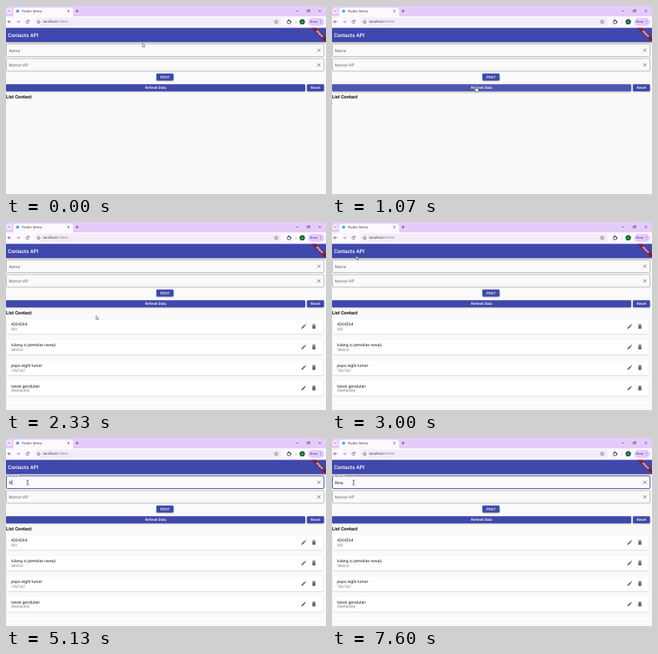
Write an HTML page with a canvas that moves like this. It is 400 px wide and 236 px high and loops after 8 s.

```html
<!DOCTYPE html>
<html lang="id">
<head>
<meta charset="utf-8">
<title>Contacts API</title>
<style>
html, body { margin: 0; width: 100%; height: 100%; overflow: hidden; background: #fafafa; }
canvas { display: block; width: 400px; height: 236px; }
</style>
</head>
<body>
<canvas id="stage"></canvas>
<script>
const W = 400, H = 236, LOOP = 8000, STEP = 200 / 3;
const BLUE = '#3f48ac', GREY = '#666', PAGE = '#fafafa';
const APP = 'Roboto, sans-serif', UI = '"Open Sans", sans-serif';
const canvas = document.getElementById('stage');
const dpr = window.devicePixelRatio || 1;
canvas.width = W * dpr;
canvas.height = H * dpr;
const c = canvas.getContext('2d');
c.textRendering = 'geometricPrecision';

const contacts = [
  ['4264264', '322'],
  ['tulang si pemalas rawaji', '585522'],
  ['popo eight lumer', '7267267'],
  ['tanok gendutan', '456456456']
];
// [time, text, caret shown]
const typing = [
  [0, '', true], [5130, 'R', true], [5330, 'R', false], [5470, 'R', true],
  [6130, '', true], [6270, 'Ri', true], [6400, 'Rin', true],
  [7070, 'Rina', true], [7270, 'Rina', false]
];
// [time, x, y] of the pointer tip
const moves = [
  [0, 170.5, 46.6], [70, 170.8, 48], [470, 177, 76], [870, 183, 106],
  [1070, 179.6, 101.3], [2329, 179.6, 101.3], [2330, 112.6, 117.6],
  [2670, 70, 82], [3000, 30.3, 42.4], [3130, 30.3, 43.2], [3329, 30.3, 43.2], [3330, 27, 56]
];

const clamp = (v) => Math.max(0, Math.min(1, v));
const lerp = (a, b, p) => a + (b - a) * p;
const ease = (p) => p * p * (3 - 2 * p);

function rect(x, y, w, h, fill) { c.fillStyle = fill; c.fillRect(x, y, w, h); }

function round(x, y, w, h, r, fill, stroke, lw) {
  c.beginPath();
  c.roundRect(x, y, w, h, r);
  if (fill) { c.fillStyle = fill; c.fill(); }
  if (stroke) { c.strokeStyle = stroke; c.lineWidth = lw; c.stroke(); }
}

function disc(x, y, r, fill) {
  c.beginPath();
  c.arc(x, y, r, 0, 7);
  c.fillStyle = fill;
  c.fill();
}

function path(points, color, lw, fill) {
  c.beginPath();
  for (let i = 0; i < points.length; i += 2) c.lineTo(points[i], points[i + 1]);
  if (fill) { c.closePath(); c.fillStyle = fill; c.fill(); }
  if (color) { c.strokeStyle = color; c.lineWidth = lw; c.stroke(); }
}

function text(s, x, y, size, color, weight = 400, family = APP, align = 'left') {
  c.font = `${weight} ${size}px ${family}`;
  c.textAlign = align;
  c.textBaseline = 'alphabetic';
  c.fillStyle = color;
  c.fillText(s, x, y + size * 0.355);
  return c.measureText(s).width;
}

function cross(x, y, r, color, lw) {
  path([x - r, y - r, x + r, y + r], color, lw);
  path([x - r, y + r, x + r, y - r], color, lw);
}

function shadowed(blur, dy, alpha, draw) {
  c.save();
  c.shadowColor = `rgba(0,0,0,${alpha})`;
  c.shadowBlur = blur * dpr;
  c.shadowOffsetY = dy * dpr;
  draw();
  c.restore();
}

function browser() {
  rect(0, 0, W, 14, '#e5cbfb');
  round(1, 2.5, 6.4, 7, 2, '#f3e6fd');
  path([3, 5.6, 4.2, 6.8, 5.4, 5.6], '#333', 0.6);
  round(9, 2, 75, 14, 3, '#fdf8ff');
  disc(14.6, 6.4, 1.9, '#45a5e6');
  text('Flutter Demo', 19.8, 6.5, 4.1, '#222', 400, UI);
  cross(78, 6.4, 1.3, '#333', 0.6);
  path([86.9, 6.4, 90.9, 6.4], '#333', 0.6);
  path([88.9, 4.4, 88.9, 8.4], '#333', 0.6);
  path([362.4, 6.3, 365.6, 6.3], '#333', 0.5);
  c.strokeStyle = '#333';
  c.lineWidth = 0.5;
  c.strokeRect(376.7, 5.3, 2.4, 2.4);
  path([377.5, 5.2, 377.5, 4.5, 379.9, 4.5, 379.9, 6.9, 379.2, 6.9], '#333', 0.4);
  cross(392.4, 6.3, 1.5, '#333', 0.5);

  rect(0, 13, W, 14.3, '#fdf8ff');
  path([6.3, 19.8, 2.4, 19.8], '#444', 0.7);
  path([4.2, 18, 2.4, 19.8, 4.2, 21.6], '#444', 0.7);
  path([13.4, 19.8, 17.3, 19.8], '#777', 0.6);
  path([15.5, 18, 17.3, 19.8, 15.5, 21.6], '#777', 0.6);
  c.beginPath();
  c.arc(27, 19.8, 1.9, 0.5, 5.7);
  c.strokeStyle = '#444';
  c.lineWidth = 0.7;
  c.stroke();
  path([29, 17.4, 29, 19.2, 27.2, 19.2], '#444', 0.6);

  round(35.5, 14.8, 309, 10.2, 5.1, '#f3ebf8');
  disc(40.8, 19.9, 3.3, '#fff');
  c.beginPath();
  c.arc(40.8, 19.9, 1.8, 0, 7);
  c.strokeStyle = '#333';
  c.lineWidth = 0.6;
  c.stroke();
  path([40.8, 19.5, 40.8, 21], '#333', 0.5);
  const w = text('localhost', 46.4, 19.8, 4.3, '#222', 400, UI);
  text(':53620', 46.4 + w, 19.8, 4.3, '#777', 400, UI);

  const star = [];
  for (let i = 0; i <= 10; i++) {
    const a = i * Math.PI / 5 - Math.PI / 2, r = i % 2 ? 1.1 : 2.4;
    star.push(337.8 + r * Math.cos(a), 19.9 + r * Math.sin(a));
  }
  path(star, '#444', 0.5);
  round(351.8, 18.2, 3.8, 3.8, 0.5, null, '#333', 0.8);
  disc(353.5, 17.9, 0.9, '#333');
  disc(355.9, 20.1, 0.9, '#333');
  path([362.5, 17, 362.5, 22.6], '#d5bfe8', 0.6);
  disc(370.3, 19.8, 3.4, '#1c6b34');
  text('s', 370.3, 19.6, 3.6, '#fff', 400, UI, 'center');
  round(377.8, 15, 20, 9.8, 4.9, '#e3cbfb');
  text('Error', 380.3, 19.8, 3.7, '#53268a', 600, UI);
  for (let i = -1; i < 2; i++) disc(393.2, 19.8 + i * 1.6, 0.45, '#53268a');
}

function appBar() {
  shadowed(2, 0.8, 0.4, () => rect(0, 27.2, W, 18, BLUE));
  text('Contacts API', 2.4, 36.3, 6.5, '#fff', 500);
  c.save();
  c.beginPath();
  c.rect(0, 27.2, W, H);
  c.clip();
  c.translate(W, 27.2);
  c.rotate(Math.PI / 4);
  rect(-13, 9.1, 26, 3.9, '#861b38');
  text('DEBUG', 0, 11.05, 3.3, '#fff', 900, APP, 'center');
  c.restore();
}

function field(y, label, hot, float, value, caret) {
  const active = float > 0;
  const tint = hot ? BLUE : GREY;
  round(0.5, y, 397, 15.8, 1.3, null, active ? BLUE : '#8c8c8c', active ? 0.9 : 0.55);
  if (active) rect(2.4, y - 0.8, 13 * float, 1.6, PAGE);
  if (!value || active) {
    text(label, 3.6, lerp(y + 8, y + 0.1, float), lerp(5.2, 3.9, float), tint);
  }
  if (active) {
    const w = text(value, 3.7, y + 8, 5.2, '#222');
    if (caret) rect(3.8 + w, y + 4.8, 0.7, 6.5, BLUE);
  }
  cross(391.1, y + 7.9, 1.9, tint, 0.75);
}

function button(x, y, w, h, label, hover, ripple) {
  const lift = hover ? 1.7 : 1;
  shadowed(1.6 * lift, 0.6 * lift, 0.38, () => round(x, y, w, h, 1.3, BLUE));
  if (hover) round(x, y, w, h, 1.3, 'rgba(255,255,255,0.08)');
  if (ripple > 0 && ripple < 1) {
    c.save();
    c.beginPath();
    c.roundRect(x, y, w, h, 1.3);
    c.clip();
    disc(180, 102, 6 + 215 * ease(clamp(ripple * 1.4)), `rgba(255,255,255,${0.2 * clamp((1 - ripple) * 2.2)})`);
    c.restore();
  }
  text(label, x + w / 2, y + h / 2, 4.56, '#fff', 500, APP, 'center');
}

function pencil(x, y) {
  path([x - 2.8, y + 2.8, x - 2.8, y + 1.5, x + 0.9, y - 2.2, x + 2.1, y - 1, x - 1.6, y + 2.8], null, 0, GREY);
  path([x + 1.3, y - 2.6, x + 1.9, y - 3.1, x + 3, y - 2, x + 2.5, y - 1.4], null, 0, GREY);
}

function bin(x, y) {
  rect(x - 2.3, y - 2.6, 4.6, 0.8, GREY);
  rect(x - 0.9, y - 3.1, 1.8, 0.7, GREY);
  round(x - 1.9, y - 1.4, 3.8, 4.4, 0.6, GREY);
}

function list() {
  c.save();
  c.beginPath();
  c.rect(0, 118, W, 109);
  c.clip();
  for (let i = 0; i < 5; i++) {
    const y = 131.4 + i * 25.8;
    shadowed(1.6, 0.5, 0.2, () => round(0.8, y - 9.6, 395.6, 18.8, 1.3, '#fff'));
    if (!contacts[i]) continue;
    text(contacts[i][0], 6.2, y - 2.8, 5.2, '#222');
    text(contacts[i][1], 6.2, y + 2.9, 4.56, '#757575');
    pencil(372.2, y - 0.3);
    bin(384.9, y - 0.3);
  }
  c.restore();
}

function pointerAt(t) {
  let i = 0;
  while (i < moves.length - 2 && moves[i + 1][0] <= t) i++;
  const [a, b] = [moves[i], moves[i + 1]];
  const p = clamp((t - a[0]) / (b[0] - a[0]));
  return { x: lerp(a[1], b[1], p), y: lerp(a[2], b[2], p) };
}

function pointer({ x, y }, kind) {
  c.save();
  c.translate(x, y);
  if (kind === 'hand') {
    path([0, 0, 0.9, 0, 1, 2.2, 3.5, 2.8, 3.6, 4.6, 2.8, 6.4, 0, 6.4, -1.8, 3.8, -1.2, 3.3, -0.2, 4, 0, 0], '#222', 0.5, '#fff');
  } else if (kind === 'beam') {
    path([0, -2.8, 0, 2.8], '#222', 0.7);
    path([-1.4, -2.9, 1.4, -2.9], '#222', 0.5);
    path([-1.4, 2.9, 1.4, 2.9], '#222', 0.5);
  } else {
    path([0, 0, 0, 4.6, 1.1, 3.7, 1.9, 5.4, 2.7, 5, 1.9, 3.4, 3.3, 3.3, 0, 0], '#222', 0.45, '#fff');
  }
  c.restore();
}

function draw(t) {
  c.setTransform(dpr, 0, 0, dpr, 0, 0);
  rect(0, 0, W, H, PAGE);
  const pos = pointerAt(t);
  const over = (top, bottom) => pos.y > top && pos.y < bottom;
  const onRefresh = over(98, 107.2);
  const kind = onRefresh ? 'hand' : over(47.8, 63.8) || over(66.2, 82) ? 'beam' : 'arrow';
  const [, value, caret] = typing.filter((s) => s[0] <= t).pop();
  const float = t < 3730 ? 0 : ease(clamp((t - 3670) / 200));

  appBar();
  browser();
  field(47.7, 'Nama', t >= 3470, float, value, caret);
  field(66, 'Nomor HP', false, 0, '', false);
  button(188, 84.8, 21.4, 8.8, 'POST');
  button(0, 98.2, 374, 8.9, 'Refresh Data', onRefresh, (t - 1270) / 730);
  button(376.2, 98.2, 21.3, 8.9, 'Reset');
  text('List Contact', 0, 113.6, 5.9, '#111', 700);
  if (t >= 2330) list();
  else rect(0, 121.8, 1, 0.5, '#777');
  pointer(pos, kind);
}

function snap(t) {
  const at = (i) => Math.round(i * STEP / 10) * 10;
  let i = Math.floor(t / STEP) + 1;
  while (at(i) > t) i--;
  return at(i);
}

const start = performance.now();
function tick() {
  draw(snap((performance.now() - start) % LOOP));
  requestAnimationFrame(tick);
}
tick();
</script>
</body>
</html>
```
